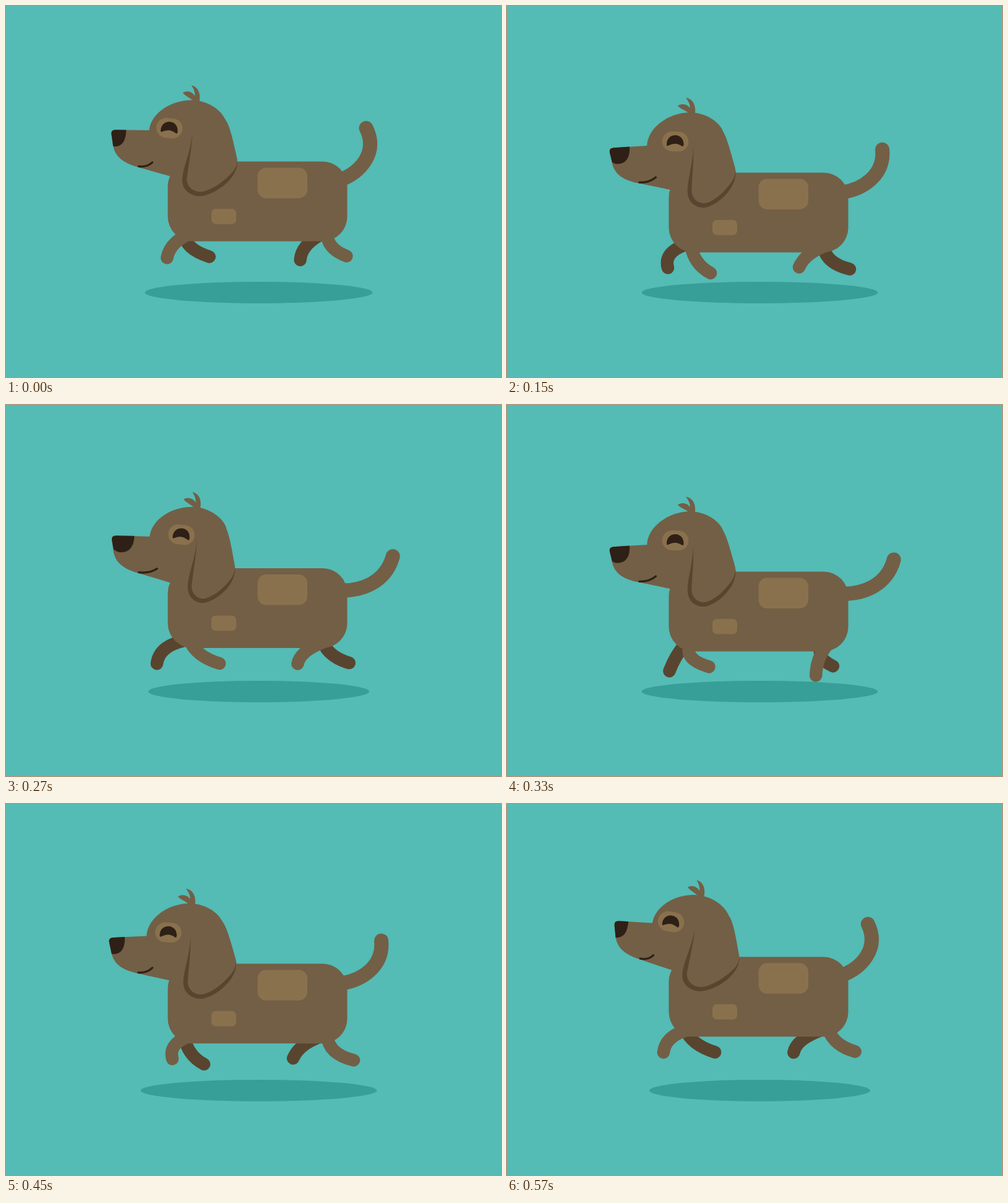
These frames come from a looping animation (800x600 px, 600 ms). An HTML page:

```html
<!DOCTYPE html>
<html lang="en">
<head>
<meta charset="utf-8">
<title>Running dog</title>
<style>
  html, body { margin: 0; width: 100%; height: 100%; overflow: hidden; background: #54bbb5; }
  svg { display: block; width: 100vw; height: 100vh; }
  .coat { fill: #735f45; }
  .shade { fill: #59452f; }
  .patch { fill: #8a714d; }
  .ink { fill: #2e2016; }
  .limb { fill: none; stroke: #735f45; stroke-width: 20.5; stroke-linecap: round; }
  .far { stroke: #59452f; }
  #tail { stroke-width: 23; }
  #mouth { fill: none; stroke: #2e2016; stroke-width: 3.2; stroke-linecap: round; }
</style>
</head>
<body>
<svg viewBox="0 0 800 600">
  <ellipse id="shadow" cx="408.5" cy="463.4" ry="17.4" fill="#379e98"/>
  <!-- y = 0 is the top of the back -->
  <g id="dog">
    <path id="frontFar" class="limb far"/>
    <path id="backFar" class="limb far"/>
    <path id="tail" class="limb"/>
    <rect class="coat" x="261.5" width="290" height="129" rx="40"/>
    <rect class="patch" x="406.5" y="10" width="80.5" height="49.5" rx="14"/>
    <rect class="patch" x="332" y="76.5" width="40" height="24.7" rx="7"/>
    <path id="frontNear" class="limb"/>
    <path id="backNear" class="limb"/>
    <g id="head">
      <g transform="translate(0 -251)">
        <path class="coat" d="M304 155C298 148 291 147 285 140C292 136 300 138 304.5 145C305 139 303 134 299 128C309 130 315 140 312 155Z"/>
        <path class="coat" d="M170 207Q169.5 200.5 177 200.5L231 201C234 173 266 152 300 152C322 152 346 165 354 183L364 250L300 285L265 275L213 260.5C190 254 177 245 173 227Z"/>
        <path id="nose" class="ink"/>
        <path id="mouth"/>
        <g id="eye">
          <rect class="patch" x="-21.3" y="-16" width="42.6" height="32" rx="16"/>
          <path class="ink" d="M-13.8 5C-13.8 -5 -7.5 -10.2 0 -10.2S13.8 -5 13.8 5Q13.5 8.5 11 7Q5 3.5 0 3.5T-11 7Q-13.5 8.5 -13.8 5Z"/>
        </g>
        <g id="ear">
          <path class="shade" d="M301 205C299 235 285 262 285 281C285 300 302 308 316 307C338 304 374 280 374 251L340 240Z"/>
          <path class="coat" d="M352 181C360 187 366 213 373.5 247Q374.5 258 366 268C352 284 334 296 318 300C302 302 291 290 292.5 278C295 255 300 235 301 205Z"/>
        </g>
      </g>
    </g>
  </g>
</svg>
<script>
const LOOP = 600, STEP = 30, BELLY = 129;
const el = Object.fromEntries([...document.querySelectorAll('[id]')].map(e => [e.id, e]));
const set = (id, name, value) => el[id].setAttribute(name, value);
const mix = (a, b, u) => a + (b - a) * u;

// Cosine that repeats n times per loop, with a crest at time peak.
const wave = (t, peak, n = 1) => Math.cos(2 * Math.PI * n * (t - peak) / LOOP);
// Short reach to the ground around one moment of the loop.
const reach = (t, at) => ((1 + wave(t, at)) / 2) ** 10;

// Heights of hip, knee and foot are measured from the belly.
const frontLeg = t => ({
  hip: [297, -12],
  knee: [282 + 27 * wave(t, 185) + 9 * wave(t, 80, 3), 8.5 + 11 * wave(t, 200) + 4 * wave(t, 90, 2)],
  foot: [299 + 49 * wave(t, 237), 25 + 21 * reach(t, 93)]
});
const backLeg = t => ({
  hip: [519, -12],
  knee: [502 + 28 * wave(t, 490) + 8 * wave(t, 175, 3), 9 + 9 * wave(t, 480)],
  foot: [517 + 56 * wave(t, 511), 24 + 22 * reach(t, 367)]
});

function drawLeg(id, { hip, knee, foot }, dx = 0) {
  const at = ([x, y]) => `${x + dx} ${y + BELLY}`;
  set(id, 'd', `M${at(hip)}Q${at(knee)} ${at(foot)}`);
}

// The far legs run half a loop apart from the near ones.
function drawLegs(t) {
  drawLeg('frontNear', frontLeg(t));
  drawLeg('backNear', backLeg(t));
  drawLeg('frontFar', frontLeg(t + LOOP / 2), -9);
  drawLeg('backFar', backLeg(t + LOOP / 2), -8);
}

function drawTail(t) {
  const u = (1 - wave(t, 0)) / 2;
  const bulge = 4 * u * (1 - u);
  const point = (x0, y0, x1, y1) => `${mix(x0, x1, u) + 2.5 * bulge} ${mix(y0, y1, u) - bulge}`;
  set('tail', 'd', `M${point(540, 30, 538, 36)}C${point(572, 18, 574, 38)} ` +
    `${point(602, -14, 614, 24)} ${point(582, -54, 626, -18.5)}`);
}

// turn slides the face and narrows the ear as the head swings round.
function drawHead(angle, turn) {
  set('head', 'transform', `rotate(${angle} 325 22)`);
  const edge = 194 + 0.667 * turn;
  set('nose', 'd', `M170 207Q169.5 200.5 177 200.5H${edge}C${edge} 217 ${188 + 0.6 * turn} 227.3 ` +
    `${176 + 0.5 * turn} 227.3Q${174 + 0.25 * turn} 227.3 173 ${227 - 0.25 * turn}Z`);
  set('mouth', 'd', `M214.5 259.3Q${228 + 0.2 * turn} 261 ${236.5 + 0.4 * turn} 252.8`);
  set('eye', 'transform', `translate(${264 + turn} 197.3) rotate(6)`);
  set('ear', 'transform', `translate(346 0) scale(${1 - 0.00787 * turn} 1) translate(-346 0)`);
}

function draw(t) {
  // Two hops per loop, landing at 90 and 390 ms; u runs from -1 to 1 in each.
  const phase = (t + LOOP - 90) % LOOP;
  const high = phase >= LOOP / 2;
  const u = phase % 300 / 150 - 1;
  const lift = (1 + Math.cos(Math.PI * u)) / 2;
  const fromTurn = Math.abs((t + 660) % LOOP - 300);

  set('shadow', 'rx', mix(198.6, 176.4, lift));
  set('dog', 'transform', `translate(0 ${mix(high ? 246 : 263.4, 280, u * u)})`);
  drawHead(mix(-6.9, high ? 4 : 1.7, lift), mix(21, -5.5, fromTurn / 300));
  drawTail(t);
  drawLegs(t);
}

const start = performance.now();
function tick() {
  const t = (performance.now() - start) % LOOP;
  draw(Math.floor(t / STEP) * STEP);
  requestAnimationFrame(tick);
}
tick();
</script>
</body>
</html>
```
